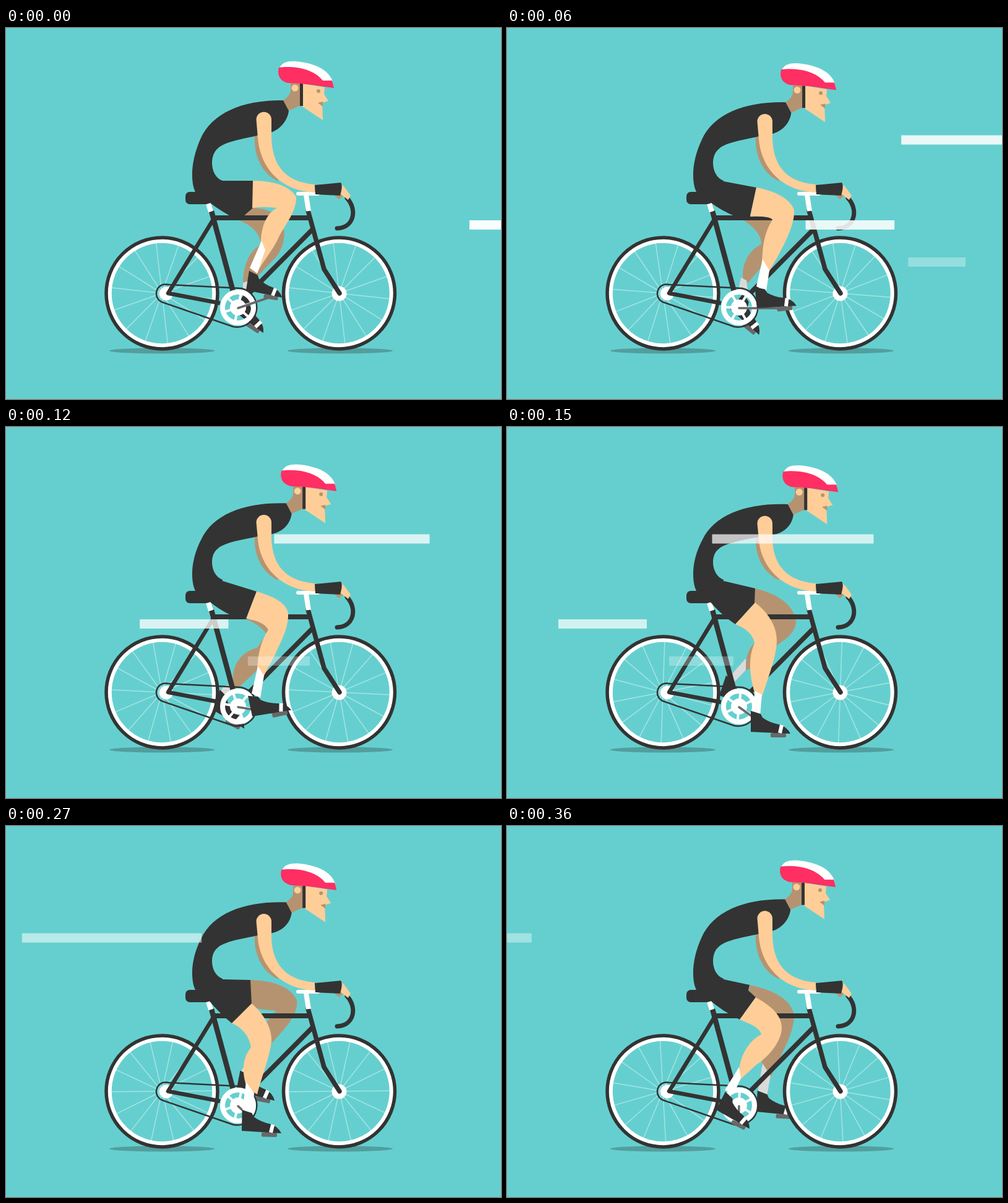
These frames come from a looping animation (800x600 px, 390 ms). An HTML page:

```html
<!DOCTYPE html>
<html lang="en">
<head>
<meta charset="utf-8">
<title>Cyclist</title>
<style>
  html, body { margin: 0; width: 100%; height: 100%; overflow: hidden; background: #65cfcf; }
  svg { display: block; width: 800px; height: 600px; }
  .pose { display: none; }
  .pose.on { display: inline; }
  .dark { fill: #333; }
  .skin { fill: #ffce98; }
  .shade { fill: #b69370; }
  .white { fill: #fff; }
  .sock2 { fill: #dadada; }
  .tube { fill: none; stroke: #333; }
</style>
</head>
<body>
<svg viewBox="0 0 800 600">
  <defs>
    <!-- heel of the sole at the origin -->
    <g id="shoe">
      <rect x="32" y="2" width="25" height="7" rx="2" fill="#686868"/>
      <path class="dark" d="M0-34 16-29 19-23Q30-15 45-12 58-9 64 3L0 0Z"/>
      <path d="M50-11 47 2" stroke="#fff" stroke-width="6"/>
    </g>
    <g id="wheel">
      <g class="spokes" stroke="#fff" stroke-opacity=".42" stroke-width="1.5"></g>
      <circle r="84.5" fill="none" stroke="#fff" stroke-width="6.5"/>
      <circle r="90" fill="none" stroke="#333" stroke-width="5.5"/>
    </g>
  </defs>

  <g fill="#529e9e">
    <ellipse cx="252" cy="522" rx="85" ry="4.5"/>
    <ellipse cx="540" cy="522" rx="85" ry="4.5"/>
  </g>

  <g id="far">
    <g class="pose">
      <path class="shade" d="M376 311C395 318 410 330 412 350 392 362 382 385 383 422L396 420C398 408 420 388 434 373 446 360 452 342 449 325 440 300 425 291 395 291Z"/>
      <path class="sock2" d="M383 412 395 408 396 434 383 430Z"/>
      <use href="#shoe" transform="translate(367 457) rotate(34) scale(.95)"/>
    </g>
    <g class="pose">
      <path class="shade" d="M381 310C400 322 411 335 411 350 388 360 378 388 382 406L390 412C400 398 420 380 428 362 440 340 445 318 425 300Z"/>
      <path class="sock2" d="M378 404 387 408 390 432 374 425Z"/>
      <use href="#shoe" transform="translate(361 455) rotate(39) scale(.97)"/>
    </g>
    <g class="pose">
      <path class="shade" d="M384 309C402 316 415 325 421 335L406 357C385 362 370 378 367 400L366 419 376 421C390 408 412 392 424 365 435 340 428 315 410 300Z"/>
      <path class="sock2" d="M352 419 367 415 368 421 360 436 346 428Z"/>
      <use href="#shoe" transform="translate(330 455) rotate(28)"/>
    </g>
    <g class="pose">
      <path class="shade" d="M400 261C432 268 464 285 467 315 466 338 440 348 425 362 410 375 396 390 386 394 386 380 387 365 395 355 410 340 425 330 428 318 420 305 410 295 396 290Z"/>
      <path class="sock2" d="M386 374 386 393 368 412 358 406Z"/>
      <use href="#shoe" transform="translate(343 434) rotate(19)"/>
    </g>
    <g class="pose">
      <path class="shade" d="M394 249C425 249 460 258 470 282 473 305 450 328 435 345 424 356 415 372 404 388L392 378C408 350 420 310 437 299 420 297 405 297 394 290Z"/>
      <path class="sock2" d="M393 376 404 386 393 403 380 396Z"/>
      <use href="#shoe" transform="translate(372 429) rotate(11)"/>
    </g>
    <g class="pose">
      <path class="shade" d="M395 253C430 258 462 275 467 296 468 318 450 345 438 365L422 398 411 385C412 360 420 330 433 308L393 290Z"/>
      <path class="sock2" d="M414 372 426 392 418 422 404 417Z"/>
      <use href="#shoe" transform="translate(402 451) rotate(3)"/>
    </g>
    <g class="pose">
      <path class="shade" d="M392 257C426 264 458 278 464 305 464 335 447 360 437 385L426 406 412 390C412 365 420 340 425 310L390 280Z"/>
      <path class="sock2" d="M413 384 426 404 420 437 405 432Z"/>
      <use href="#shoe" transform="translate(403 462) rotate(3)"/>
    </g>
  </g>

  <use href="#wheel" x="252" y="429"/>
  <use href="#wheel" x="538.5" y="429"/>
  <circle class="white" cx="259" cy="429.500" r="11"/>
  <circle class="white" cx="538.500" cy="429.500" r="12"/>

  <g class="tube">
    <path d="M262 415 380 421A31 31 0 1 1 367 483L254 444A15 15 0 0 1 262 415Z" stroke-width="2.500"/>
    <path d="M336 308 262 429 346 445" stroke-width="6.500" stroke-linejoin="round"/>
    <path d="M332 296 367 426" stroke-width="8.500"/>
    <path d="M336 307H490" stroke-width="8"/>
    <path d="M497 324 394 428" stroke-width="7.500"/>
    <path d="M488 295 499 335 514 390 539 429" stroke-width="7.500" stroke-linecap="round" stroke-linejoin="round"/>
    <path d="M551 275C568 293 563 323 535 324" stroke-width="7" stroke-linecap="round"/>
  </g>
  <g fill="none" stroke="#fff">
    <path d="M327 284 331 297" stroke-width="8"/>
    <path d="M485 270 489 296" stroke-width="8"/>
    <path d="M472 268H504" stroke-width="6" stroke-linecap="round"/>
  </g>

  <g transform="translate(375 452)">
    <circle id="gap" r="22" fill="#65cfcf"/>
    <circle r="25" fill="none" stroke="#fff" stroke-width="8"/>
    <g id="arms" stroke="#fff" stroke-width="4"></g>
    <circle class="white" r="13"/>
  </g>
  <path id="crank" fill="none" stroke="#686868" stroke-width="3.500" stroke-linecap="round"/>

  <rect class="dark" x="290" y="265" width="40" height="20" rx="7"/>

  <g id="near">
    <g class="pose">
      <path class="dark" d="M318 240 350 247 399 247 399 291 376 311Q349 298 326 280Z"/>
      <path class="skin" d="M399 247C432 247 458 255 469 273 470 298 448 322 440 340 431 360 415 377 406 396L397 385C408 365 412 350 412 342 414 315 424 298 438 291Q415 288 398 291Z"/>
      <path class="white" d="M413 344 419 359 406 397 394 388Z"/>
      <use href="#shoe" transform="translate(388 424) rotate(9) scale(.93)"/>
    </g>
    <g class="pose">
      <path class="dark" d="M318 240 350 248 403 258 392 308 370 305Q347 296 326 280Z"/>
      <path class="skin" d="M403 258C432 263 458 276 464 294 466 316 448 350 440 365L423 395 412 385C413 362 413 335 429 310Q425 304 393 305Z"/>
      <path class="white" d="M413 374 424 392 419 425 403 418Z"/>
      <use href="#shoe" transform="translate(404 453) rotate(-6)"/>
    </g>
    <g class="pose">
      <path class="dark" d="M318 240 350 249 405 266 388 311 365 305Q345 296 326 280Z"/>
      <path class="skin" d="M405 266C432 274 453 284 456 301 457 325 445 345 435 368L416 404 406 396C406 370 412 345 424 328 418 317 405 313 388 310Z"/>
      <path class="white" d="M407 387 417 402 411 438 397 431Z"/>
      <use href="#shoe" transform="translate(398 468) rotate(-12)"/>
    </g>
    <g class="pose">
      <path class="dark" d="M318 240 350 249 401 261 400 285 369 319Q345 303 326 280Z"/>
      <path class="skin" d="M401 284C422 300 436 322 436 345 436 370 422 405 413 434L401 432C391 400 390 372 400 350 398 335 385 325 369 319Z"/>
      <path class="white" d="M401 427 412 433 409 467 395 461Z"/>
      <use href="#shoe" transform="translate(394 493)"/>
    </g>
    <g class="pose">
      <path class="dark" d="M318 240 350 248 395 249 397 288 365 319Q345 303 326 280Z"/>
      <path class="skin" d="M397 287C415 302 429 325 429 345 429 365 415 400 406 434L390 425C380 398 382 375 396 358 393 340 382 326 365 319Z"/>
      <path class="white" d="M388 414 401 432 398 467 382 461Z"/>
      <use href="#shoe" transform="translate(381 493) rotate(1)"/>
    </g>
    <g class="pose">
      <path class="dark" d="M318 240 350 248 395 253 400 282 371 317Q345 300 326 280Z"/>
      <path class="skin" d="M400 282C422 297 437 315 437 336 437 355 418 385 406 408L390 425 378 412C379 385 390 362 404 346 401 332 388 323 371 317Z"/>
      <path class="white" d="M377 406 390 424 380 454 364 449Z"/>
      <use href="#shoe" transform="translate(358 482) rotate(15)"/>
    </g>
    <g class="pose">
      <path class="dark" d="M318 240 350 248 392 257 390 266 402 277 376 313Q347 299 326 280Z"/>
      <path class="skin" d="M402 277C425 290 444 305 444 326 444 347 425 372 402 387L378 409 375 396C378 365 395 345 411 337 408 325 392 320 376 313Z"/>
      <path class="white" d="M375 390 378 408 366 434 352 427Z"/>
      <use href="#shoe" transform="translate(338 459) rotate(27) scale(.97)"/>
    </g>
  </g>

  <path id="farArm" class="shade"/>
  <g id="head">
    <path class="shade" d="M460 88H479V124L456 134 446 118Q460 110 460 100Z"/>
    <path class="skin" d="M479 90 515 96 514 107 521 118 511 121 512 149 479 127Z"/>
    <path class="shade" d="M504 121 512 119 512 127Z"/>
    <circle class="shade" cx="505" cy="102" r="3"/>
    <circle class="skin" cx="467" cy="97" r="5.500"/>
    <path class="tube" d="M477.500 90V126" stroke-width="5"/>
    <path class="white" d="M441 68C444 54 458 53 470 54 500 57 522 68 528 87L505 90Z"/>
    <path d="M441 64C462 61 495 64 512 85H527L530 97C505 94 482 89 456 89 442 86 438 75 441 64Z" fill="#ff2f63"/>
  </g>
  <path id="torso" class="dark"/>
  <path id="arm" class="skin"/>
  <path class="shade" d="M528 268 546 270 538 277Z"/>
  <path class="skin" d="M540 252 546 256 557 271 553 278 540 268Z"/>
  <path class="dark" d="M499 254 541 250Q545 254 540 271L500 269Z"/>

  <g id="lines" fill="#fff"></g>
</svg>
<script>
const STEP = 30, LOOP = 390;
const $ = id => document.getElementById(id);
const near = [...$('near').children], far = [...$('far').children];
const spokes = document.querySelector('.spokes');

const line = (r1, r2, deg) => {
  const a = deg * Math.PI / 180, c = Math.cos(a), s = Math.sin(a);
  return `<path d="M${c * r1} ${s * r1}L${c * r2} ${s * r2}"/>`;
};
const star = (n, r1, r2) => Array.from({ length: n }, (_, i) => line(r1, r2, i * 360 / n)).join('');
spokes.innerHTML = star(14, 0, 82);
$('arms').innerHTML = star(6, 10, 23);

// left edge, right edge and their speeds per step; opacity and its fade
const streaks = [
  { y: 311, x: 749, vx: -133.2, end: 893, vend: -133.4, a: .97, fade: .053 },
  { y: 173.5, x: 841, vx: -101.9, end: 1053, vend: -92.1, a: .97, fade: .053 },
  { y: 371, x: 906, vx: -128.8, end: 991, vend: -125, a: .34, fade: .015 }
];
const bars = streaks.map(s => {
  const r = document.createElementNS('http://www.w3.org/2000/svg', 'rect');
  r.setAttribute('y', s.y);
  r.setAttribute('height', 15);
  $('lines').append(r);
  return r;
});

function body(b) {
  const x = 7 * b, y = 9.5 * b;
  $('head').setAttribute('transform', `translate(${6.3 * b} ${10 * b})`);
  $('torso').setAttribute('d',
    `M${448 + x} ${117 + y}C${385 + x} ${116 + .8 * y} ${333 + .5 * x} ${136 + .5 * y} ${314 + .3 * x} ${180 + .3 * y}` +
    `C302 208 298 235 303 257 307 272 316 279 328 284L345 270 350 247` +
    `C330 240 328 207 342 ${195 + .3 * y} 352 ${184 + .4 * y} 385 ${179 + .4 * y} 406 ${174 + .5 * y}` +
    `L428 ${169 + .7 * y}C${443 + x} ${164 + y} ${455 + x} ${150 + y} ${457 + x} ${134 + y}Z`);
  $('arm').setAttribute('d',
    `M404.500 ${148 + y}A12.200 12.200 0 0 1 429 ${148 + y}L429 ${176 + .6 * y}` +
    `C430 220 449 249 499 253V266C445 264 411 227 407 ${178 + .6 * y}Z`);
  $('farArm').setAttribute('d', `M402 ${172 + .5 * y}C400 205 412 235 440 248L425 190Z`);
}

function pedal(p) {
  near.forEach((g, i) => g.classList.toggle('on', i === p));
  far.forEach((g, i) => g.classList.toggle('on', i === p));
  const m = near[p].querySelector('use').transform.baseVal.consolidate().matrix;
  const px = m.a * 44 + m.c * 5 + m.e, py = m.b * 44 + m.d * 5 + m.f;
  $('crank').setAttribute('d', `M375 453L${px} ${py}`);
  $('arms').setAttribute('transform', `rotate(${Math.atan2(py - 452, px - 375) * 180 / Math.PI})`);
  // the far shoe shows through the chainring except while it is raised
  $('gap').setAttribute('visibility', p === 3 || p === 4 ? 'visible' : 'hidden');
}

function draw(t) {
  const n = Math.floor(t % LOOP / STEP);
  const k = n > 5 ? n - 1 : n; // the sixth step is held twice as long
  body(1 - Math.abs(k - 6) / 6);
  pedal(Math.ceil(k / 2));
  spokes.setAttribute('transform', `rotate(${212 + 12 * k})`);
  streaks.forEach((s, i) => {
    const x = s.x + s.vx * k;
    bars[i].setAttribute('x', x);
    bars[i].setAttribute('width', s.end + s.vend * k - x);
    bars[i].setAttribute('opacity', s.a - s.fade * k);
  });
}

const start = performance.now();
function tick() {
  draw(performance.now() - start);
  requestAnimationFrame(tick);
}
tick();
</script>
</body>
</html>
```
